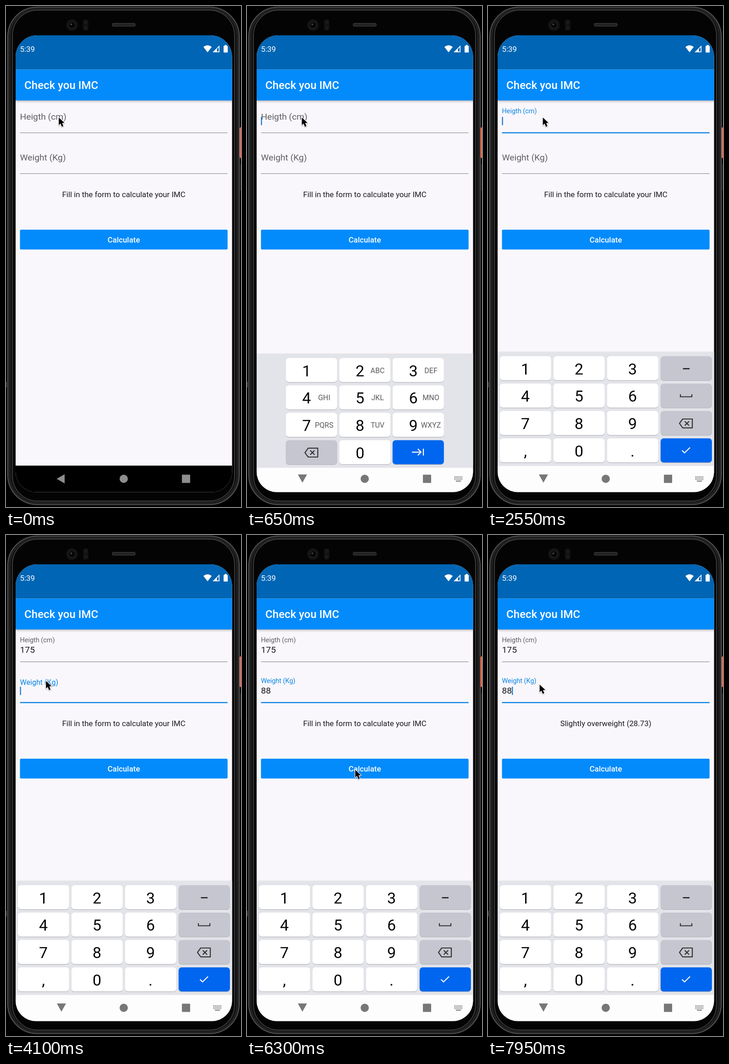
Animation of 513x1093 px, one loop 8 s. Source, as an HTML page with a canvas:

```html
<!DOCTYPE html>
<html lang="en">
<head>
<meta charset="utf-8">
<title>IMC form</title>
<style>
html, body { margin: 0; width: 100%; height: 100%; overflow: hidden; background: #000; }
canvas { display: block; width: 513px; height: 1093px; }
</style>
</head>
<body>
<canvas id="stage"></canvas>
<script>
const W = 513, H = 1093, LOOP = 8000, STEP = 50;
const BLUE = '#038bfb', FOCUS = '#0a84e2', INK = '#1c1b1f', MUTED = '#5f5e63', PAPER = '#f9f7fb';
const canvas = document.getElementById('stage');
const dpr = window.devicePixelRatio || 1;
canvas.width = W * dpr;
canvas.height = H * dpr;
const c = canvas.getContext('2d');

const clamp = v => Math.max(0, Math.min(1, v));
const span = (t, a, b) => clamp((t - a) / (b - a));
const smooth = p => p * p * (3 - 2 * p);
const mix = (a, b, p) => a + (b - a) * p;

function rect(x, y, w, h, fill) {
  c.fillStyle = fill;
  c.fillRect(x, y, w, h);
}
function round(x, y, w, h, r, fill) {
  c.beginPath();
  c.roundRect(x, y, w, h, r);
  c.fillStyle = fill;
  c.fill();
}
function ring(x, y, w, h, r, color, width) {
  c.beginPath();
  c.roundRect(x, y, w, h, r);
  c.strokeStyle = color;
  c.lineWidth = width;
  c.stroke();
}
function disc(x, y, r, fill) {
  c.beginPath();
  c.arc(x, y, r, 0, Math.PI * 2);
  c.fillStyle = fill;
  c.fill();
}
function path(points, closed) {
  c.beginPath();
  points.forEach(([x, y]) => c.lineTo(x, y));
  if (closed) c.closePath();
}
function poly(points, fill) {
  path(points, true);
  c.fillStyle = fill;
  c.fill();
}
function line(points, color, width) {
  path(points);
  c.strokeStyle = color;
  c.lineWidth = width;
  c.stroke();
}
function text(s, x, y, size, color, align = 'left', weight = 400) {
  c.font = `${weight} ${size}px Roboto, sans-serif`;
  c.textAlign = align;
  c.fillStyle = color;
  c.fillText(s, x, y);
}

// Timeline
const HEIGHT_FOCUS = 600, WEIGHT_FOCUS = 4000, LAYOUT_SWAP = 900, RESULT = 6550;
const heightKeys = [2700, 2950, 3200], weightKeys = [4550, 4750];
const pointerMoves = [
  { from: 0, to: 0, x: 114, y: 242 },
  { from: 150, to: 400, x: 118.5, y: 242 },
  { from: 3400, to: 3850, x: 86, y: 317 },
  { from: 5150, to: 6000, x: 235, y: 511 },
  { from: 6950, to: 7600, x: 111.5, y: 325 }
];
const typed = (s, times, t) => s.slice(0, times.filter(k => t >= k).length);

function pointerAt(t) {
  let { x, y } = pointerMoves[0];
  for (const m of pointerMoves.slice(1)) {
    const p = smooth(span(t, m.from, m.to));
    x = mix(x, m.x, p);
    y = mix(y, m.y, p);
  }
  return [x, y];
}

function caretOn(t, marks) {
  const last = Math.max(...marks.filter(m => t >= m));
  return (t - last) % 1000 < 500;
}

function drawBody() {
  rect(0, 0, W, H, '#000');
  round(2, 1, 509, 1089, 66, '#0b0b0b');
  ring(4, 2.5, 505, 1085, 64, '#565656', 2);
  ring(8, 6, 497, 1078, 60, '#202020', 5);
  ring(14, 9, 485, 1071, 55, '#3a3a3b', 2);
  round(15.5, 10.5, 482, 1068, 54, '#040404');
  rect(0, 820, 1.5, 12, '#555');
  round(510, 264.5, 8, 67.5, 3, '#ee674d');
  round(511, 345, 8, 58, 2, '#232323');
  disc(144, 41.5, 13, '#111');
  disc(144, 41.5, 9, '#1d1d1f');
  disc(144, 41.5, 6.5, '#050507');
  disc(142.5, 40, 2, '#42454d');
  round(168, 29, 12, 25, 5, '#111');
  disc(174, 35.5, 4, '#19191a');
  disc(174, 47.5, 4, '#19191a');
  round(231, 37, 52, 8, 4, '#303030');
  round(233, 39, 48, 4.5, 2, '#222');
}

function drawStatus() {
  rect(21, 64, 473, 74.5, '#0065b4');
  text('5:39', 30.5, 100, 16.86, '#fff');
  c.beginPath();
  c.moveTo(440, 101);
  c.lineTo(431, 89.5);
  c.quadraticCurveTo(440, 82, 449, 89.5);
  c.closePath();
  c.fillStyle = '#fff';
  c.fill();
  poly([[451, 101], [466, 101], [466, 86]], '#fff');
  poly([[460.5, 99.3], [464.3, 99.3], [464.3, 90], [460.5, 93.8]], '#0065b4');
  round(475, 87, 9, 14.5, 1.2, '#fff');
  rect(477.3, 85, 4.4, 3, '#fff');
}

function drawAppBar() {
  c.save();
  c.shadowColor = 'rgba(0,0,0,.35)';
  c.shadowBlur = 5 * dpr;
  c.shadowOffsetY = 2 * dpr;
  rect(21, 138.5, 473, 67.5, BLUE);
  c.restore();
  drawStatus();
  text('Check you IMC', 40.1, 180.5, 24.06, '#fff', 'left', 500);
}

function drawField(top, label, value, lift, focused, caret) {
  const x = 30.5, underline = top + 70.6;
  text(label, x, top + mix(41.7, 27.6, lift), mix(19.25, 14.44, lift), focused ? FOCUS : MUTED);
  text(value, x, top + 51.2, 19.25, INK);
  const weight = focused ? 2.4 : 1.2;
  rect(30.5, underline - weight / 2, 453.2, weight, focused ? FOCUS : '#8f8e92');
  if (caret) {
    c.font = '400 19.25px Roboto, sans-serif';
    rect(x + c.measureText(value).width, top + 36, 2.2, 18, '#1573cf');
  }
}

function backspace(x, y) {
  c.lineJoin = 'round';
  path([[x - 14, y], [x - 7, y - 9.7], [x + 14, y - 9.7], [x + 14, y + 9.7], [x - 7, y + 9.7]], true);
  c.strokeStyle = '#333';
  c.lineWidth = 2.2;
  c.stroke();
  line([[x - 2.5, y - 4.8], [x + 7, y + 4.8]], '#333', 2.2);
  line([[x + 7, y - 4.8], [x - 2.5, y + 4.8]], '#333', 2.2);
  c.lineJoin = 'miter';
}

function key(x, y, fill) {
  round(x - 0.2, y + 1.3, 112, 52.4, 6.5, '#b4b5bc');
  round(x - 0.2, y, 112, 52.4, 6.5, fill);
}

const GRAY_KEY = '#c6c6d0', ENTER_KEY = '#0066ef', ROW = 59.75, DIGIT_BASE = 39.6;
const digit = (s, x, y) => text(s, x, y + DIGIT_BASE, 34, '#050505', 'center');

function drawPhonePad() {
  const letters = ['', 'ABC', 'DEF', 'GHI', 'JKL', 'MNO', 'PQRS', 'TUV', 'WXYZ'];
  for (let i = 0; i < 12; i++) {
    const x = 85 + (i % 3) * 116.5, y = 764 + Math.floor(i / 3) * ROW;
    key(x, y, i === 9 ? GRAY_KEY : i === 11 ? ENTER_KEY : '#fff');
    if (i < 9) {
      digit(i + 1, x + 45, y);
      text(letters[i], x + 83.5, y + 32.5, 16, '#5a5a5e', 'center');
    }
  }
  const y = 764 + 3 * ROW;
  backspace(140.5, y + 27);
  digit('0', 246.8, y);
  line([[360, y + 26], [380, y + 26]], '#fff', 2.2);
  line([[373, y + 19], [380, y + 26], [373, y + 33]], '#fff', 2.2);
  line([[385, y + 18.5], [385, y + 33.5]], '#fff', 2.2);
}

function drawNumberPad() {
  const labels = ['123', '456', '789', ',0.'];
  labels.forEach((row, r) => {
    const y = 764 + r * ROW;
    for (let i = 0; i < 4; i++) {
      const x = 26 + i * 117;
      key(x, y, i < 3 ? '#fff' : r === 3 ? ENTER_KEY : GRAY_KEY);
      if (i < 3) digit(row[i], x + 55.5, y);
    }
  });
  rect(425.5, 790, 14.5, 2.6, '#222');
  line([[420, 847], [420, 852.5], [445, 852.5], [445, 847]], '#333', 2.2);
  backspace(432, 910.7);
  line([[423.5, 969.5], [429, 975], [441, 963.2]], '#fff', 2.2);
}

function drawNav(open) {
  const color = open ? '#777779' : '#8d8d8f';
  if (open) {
    poly([[111, 1022], [131, 1022], [121, 1040]], color);
    for (let r = 0; r < 3; r++)
      for (let i = 0; i < 6; i++) rect(452.5 + i * 3.1, 1026 + r * 3.1, 1.9, 1.9, color);
    rect(456, 1035.6, 11, 2, color);
  } else {
    poly([[110.5, 1031.5], [128, 1021.5], [128, 1041.5]], color);
  }
  disc(257, 1031.5, 9, color);
  round(384, 1022.5, 18, 18, 1, color);
}

function drawKeyboard(t) {
  rect(21, 1002.7, 473, 60, '#000');
  const p = span(t, 400, 750);
  if (p > 0) {
    const drop = t >= LAYOUT_SWAP ? 0 : 305 * Math.pow(1 - p, 3.45);
    c.save();
    c.translate(0, drop);
    const edge = c.createLinearGradient(0, 753, 0, 757);
    edge.addColorStop(0, 'rgba(200,200,206,0)');
    edge.addColorStop(1, '#dedfe4');
    rect(21, 753, 473, 4, edge);
    rect(21, 756, 473, 248, '#e3e4e9');
    rect(21, 1003.5, 473, 60, '#fefdfe');
    if (t < LAYOUT_SWAP) drawPhonePad();
    else drawNumberPad();
    c.restore();
  }
  drawNav(t >= 500);
}

function drawPointer(x, y) {
  c.save();
  c.translate(x + 0.6, y + 0.9);
  c.scale(0.9, 0.9);
  path([[0.7, 0.5], [0.7, 19], [5, 15.2], [8.2, 22.8], [11.9, 21.2], [8.8, 13.8], [14.5, 13.5]], true);
  c.lineJoin = 'round';
  c.strokeStyle = '#fff';
  c.lineWidth = 2.6;
  c.shadowColor = 'rgba(0,0,0,.3)';
  c.shadowBlur = 2 * dpr;
  c.shadowOffsetY = dpr;
  c.stroke();
  c.shadowColor = 'transparent';
  c.fillStyle = '#000';
  c.fill();
  c.restore();
}

function drawScreen(t) {
  c.save();
  c.beginPath();
  c.roundRect(21, 64, 472.5, 996.5, [47, 47, 44, 44]);
  c.clip();
  rect(21, 64, 473, 997, PAPER);
  drawAppBar();

  const onWeight = t >= WEIGHT_FOCUS;
  const onHeight = t >= HEIGHT_FOCUS && !onWeight;
  drawField(206, 'Heigth (cm)', typed('175', heightKeys, t),
    smooth(span(t, 650, 850)), onHeight && t > 650,
    onHeight && caretOn(t, [HEIGHT_FOCUS, 1100, ...heightKeys]));
  drawField(295, 'Weight (Kg)', typed('88', weightKeys, t),
    smooth(span(t, WEIGHT_FOCUS, WEIGHT_FOCUS + 165)), onWeight,
    onWeight && caretOn(t, [WEIGHT_FOCUS, ...weightKeys]));

  const message = t < RESULT ? 'Fill in the form to calculate your IMC' : 'Slightly overweight (28.73)';
  text(message, 257.1, 417, 16.84, INK, 'center');
  round(30.5, 488, 453.2, 43.3, 2.4, BLUE);
  text('Calculate', 257.1, 515.8, 16.84, '#fff', 'center', 500);
  drawKeyboard(t);
  c.restore();
}

function frame(now) {
  const t = Math.floor((now % LOOP) / STEP) * STEP;
  c.setTransform(dpr, 0, 0, dpr, 0, 0);
  drawBody();
  drawScreen(t);
  drawPointer(...pointerAt(t));
}

let start;
function tick(now) {
  if (start === undefined) start = now;
  frame(now - start);
  requestAnimationFrame(tick);
}
frame(0);
requestAnimationFrame(tick);
</script>
</body>
</html>
```
